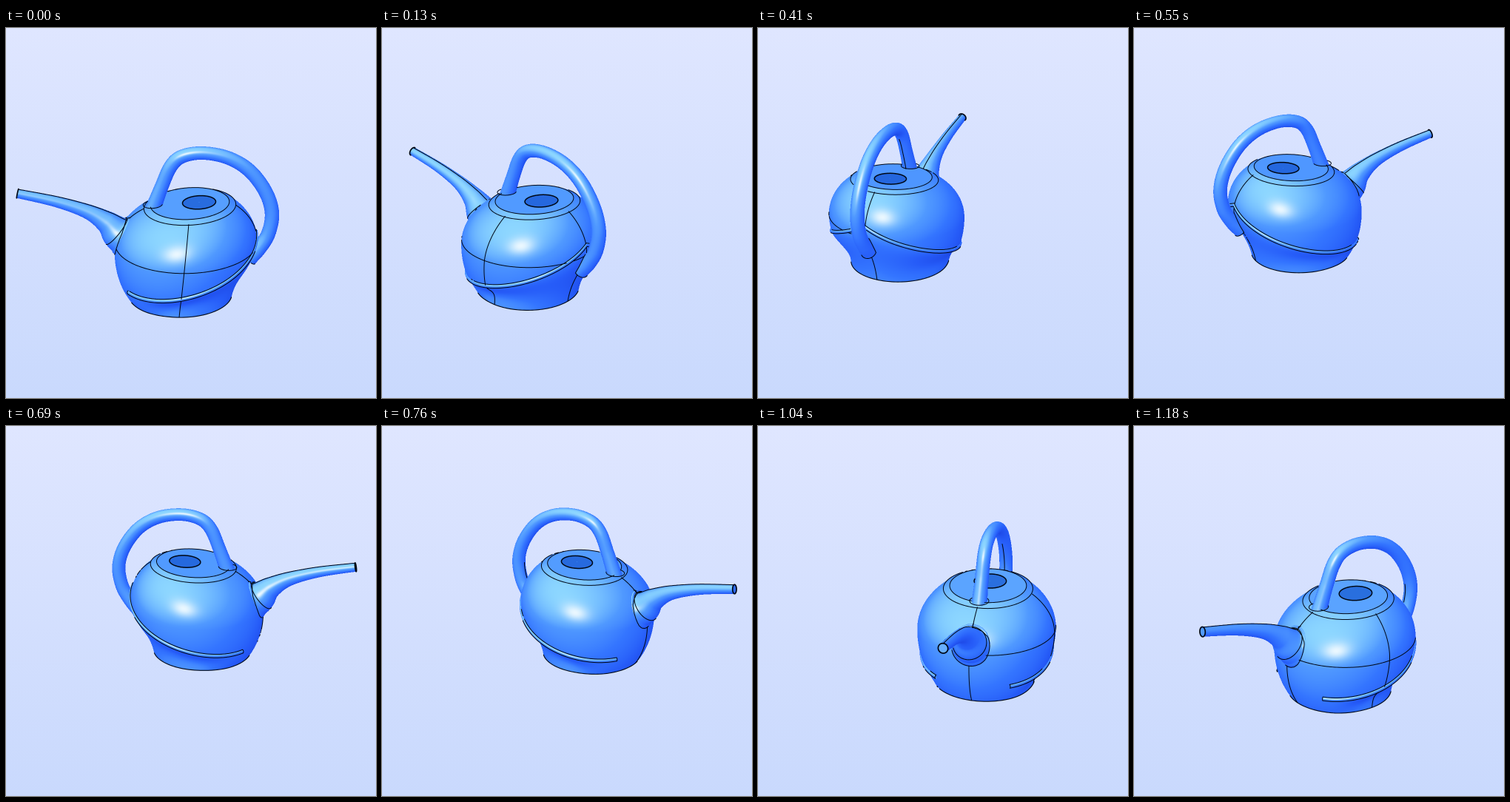
Recreate the animation shown at these times as an HTML page with a canvas. Size 500 by 500 pixels, loop 1.25 s.

```html
<!DOCTYPE html>
<html lang="en">
<head>
<meta charset="utf-8">
<title>Turning watering can</title>
<style>
html, body { margin: 0; height: 100%; overflow: hidden; background: #d4dffe; }
canvas { display: block; width: 100vw; height: 100vh; }
</style>
</head>
<body>
<canvas id="stage" width="500" height="500"></canvas>
<script>
const SIZE = 500, S = 2, W = SIZE * S;
const LOOP = 1250, FRAMES = 18, TURN = 2 * Math.PI / 19;
const { PI, sin, cos, abs, min, max, hypot, exp, sqrt, floor, ceil } = Math;
const rad = d => d * PI / 180;
const mix = (a, b, t) => a + (b - a) * t;
const smooth = (a, b, x) => {
  const t = min(1, max(0, (x - a) / (b - a)));
  return t * t * (3 - 2 * t);
};

// ---- camera ----
const TILT = rad(24.2), CE = cos(TILT), SE = sin(TILT), DIST = 1800;
const AXIS_X = 245.5, AXIS_Y = 247.6, ORBIT = 66;
let ca = 1, sa = 0, ox = 0, oz = 0;

function aim(angle) {
  ca = cos(angle);
  sa = sin(angle);
  ox = ORBIT * cos(angle - rad(83.5));
  oz = ORBIT * sin(angle - rad(83.5));
}
// model axes: u toward the spout, y up, w to the side
function viewDir([u, y, w]) {
  const x = u * ca + w * sa, z = u * sa - w * ca;
  return [x, y * CE - z * SE, z * CE + y * SE];
}
function project(p) {
  const [vx, vy, vz] = viewDir(p);
  const x = vx + ox, y = vy - oz * SE, d = vz + oz * CE;
  const k = DIST / (DIST - d);
  return [S * (AXIS_X + k * x), S * (AXIS_Y - k * y), d];
}

// ---- shapes ----
const LOW = -90, HIGH = 37, TALL = HIGH - LOW;
const level = y => (y - LOW) / TALL;
const fromBack = a => PI - Math.acos(max(-1, min(1, cos(a))));
const ridgeY = a => -64 * sin(0.62 * fromBack(a));

function bodyRadius(a, y) {
  const h = (y + 18) / (y > -18 ? 70 : 110);
  const full = 93 * sqrt(max(0, 1 - h * h));
  const t = ridgeY(a) - y;
  if (t <= 0) return full;
  const b = fromBack(a);
  const inset = (1 - smooth(rad(95), rad(138), b)) * (full - min(full, 68));
  const len = 15 + 45 * ((1 + cos(b)) / 2) ** 5;
  return full - inset * (1 - exp(-((t / len) ** 2)));
}
function body(a, s, out = 0, up = 0) {
  const y = LOW + s * TALL, r = bodyRadius(a, y) + out;
  return [-12 * s + r * cos(a), y + up - 3.3 * s * s * cos(a), r * sin(a)];
}
function insideBody([u, y, w]) {
  if (y > HIGH) return false;
  const c = u + 12 * level(y);
  return hypot(c, w) < bodyRadius(Math.atan2(w, c), y);
}
function ridge(a, t) {
  return body(a, level(ridgeY(a)), 0.2 + 2 * cos(t), 2.6 * sin(t));
}
const lidY = u => 41 - 0.055 * (u + 12);
function lidRing(a, r, u0, lift = 0) {
  const u = u0 + r * cos(a);
  return [u, lidY(u) + lift, r * sin(a)];
}
function bevel(a, t) {
  const r = mix(59.5, 51, t), u = -12 + r * cos(a);
  return [u, lidY(u) - 4 * (1 - t), r * sin(a)];
}

// each knot: u, y, radius
const SPOUT = [[60, -14, 33], [76, -5, 27], [84, 0, 22], [97, 13, 15],
  [121, 27.5, 9.8], [161, 41, 7.3], [211, 52, 6]];
const HANDLE = [[35, 33, 11], [33, 40, 10], [24, 64.7, 9], [12.5, 92, 9],
  [-2.3, 106, 8.8], [-28.8, 110.8, 8.5], [-61, 104.5, 8.7], [-88.5, 87, 9],
  [-109.5, 58, 9.2], [-118.5, 28, 9.3], [-114.5, -1.2, 9.4],
  [-103, -22, 10], [-90, -37, 11]];

function along(knots, t) {
  const n = knots.length - 1;
  t = min(n, max(0, t));
  const i = min(n - 1, floor(t)), f = t - i;
  const at = j => knots[min(n, max(0, j))];
  const [a, b, c, d] = [at(i - 1), at(i), at(i + 1), at(i + 2)];
  return b.map((v, j) => v + f / 2 * (c[j] - a[j] +
    f * (2 * a[j] - 5 * v + 4 * c[j] - d[j] + f * (3 * (v - c[j]) + d[j] - a[j]))));
}
function tube(knots, t, a, grow = 1) {
  const [u, y, r] = along(knots, t);
  const p = along(knots, t - 0.02), q = along(knots, t + 0.02);
  const du = q[0] - p[0], dy = q[1] - p[1], len = hypot(du, dy);
  const k = r * grow * cos(a) / len;
  return [u - dy * k, y + du * k, r * grow * sin(a)];
}
const spout = (t, a) => tube(SPOUT, t, a);
const handle = (t, a) => tube(HANDLE, t, a);

// ---- rasteriser ----
const buf = document.createElement("canvas");
buf.width = buf.height = W;
const pen = buf.getContext("2d");
const img = pen.createImageData(W, W);
const depth = new Float32Array(W * W);

const RAMP = [[0, 30, 74, 232], [0.3, 38, 92, 248], [0.58, 52, 117, 255],
  [0.81, 80, 153, 255], [1, 140, 214, 255]];
const unit = v => {
  const l = hypot(...v) || 1;
  return v.map(c => c / l);
};
const LIGHT = unit([-0.28, 0.42, 0.86]), SHINE = unit([-0.15, 0.1, 0.98]);
const dot = (a, x, y, z) => a[0] * x + a[1] * y + a[2] * z;

function paint(at, x, y, z, tone) {
  const l = (z < 0 ? -1 : 1) / (hypot(x, y, z) || 1);
  x *= l; y *= l; z *= l;
  const t = min(1, max(0, (dot(LIGHT, x, y, z) + 0.45) / 1.45));
  let i = 1;
  while (i < RAMP.length - 1 && RAMP[i][0] < t) i++;
  const a = RAMP[i - 1], b = RAMP[i], f = (t - a[0]) / (b[0] - a[0]);
  const g = tone < 1 ? 0 : 0.95 * max(0, dot(SHINE, x, y, z)) ** 65;
  const px = img.data;
  px[at] = mix(mix(a[1], b[1], f) * tone * tone, 240, g);
  px[at + 1] = mix(mix(a[2], b[2], f) * tone, 250, g);
  px[at + 2] = mix(mix(a[3], b[3], f) * (0.6 + 0.4 * tone), 255, g);
  px[at + 3] = 255;
}
function triangle(a, b, c, tone) {
  const area = (b[0] - a[0]) * (c[1] - a[1]) - (b[1] - a[1]) * (c[0] - a[0]);
  if (abs(area) < 1e-6) return;
  const x0 = max(0, ceil(min(a[0], b[0], c[0]) - 0.5));
  const x1 = min(W - 1, floor(max(a[0], b[0], c[0]) - 0.5));
  const y0 = max(0, ceil(min(a[1], b[1], c[1]) - 0.5));
  const y1 = min(W - 1, floor(max(a[1], b[1], c[1]) - 0.5));
  for (let y = y0; y <= y1; y++) {
    for (let x = x0; x <= x1; x++) {
      const px = x + 0.5, py = y + 0.5;
      const p = ((b[0] - px) * (c[1] - py) - (b[1] - py) * (c[0] - px)) / area;
      const q = ((c[0] - px) * (a[1] - py) - (c[1] - py) * (a[0] - px)) / area;
      const r = 1 - p - q;
      if (p < -1e-6 || q < -1e-6 || r < -1e-6) continue;
      const d = p * a[2] + q * b[2] + r * c[2], at = y * W + x;
      if (d <= depth[at]) continue;
      depth[at] = d;
      paint(at * 4, p * a[3] + q * b[3] + r * c[3], p * a[4] + q * b[4] + r * c[4],
        p * a[5] + q * b[5] + r * c[5], tone);
    }
  }
}
function normal(f, s, t) {
  const e = 0.004;
  const p = f(s + e, t), q = f(s - e, t), g = f(s, t + e), h = f(s, t - e);
  const [a, b, c] = p.map((v, i) => v - q[i]);
  const [d, k, m] = g.map((v, i) => v - h[i]);
  return unit([b * m - c * k, c * d - a * m, a * k - b * d]);
}
function surface(f, [s0, s1, ns], [t0, t1, nt], tone = 1) {
  let last = null;
  for (let i = 0; i <= ns; i++) {
    const row = [];
    for (let j = 0; j <= nt; j++) {
      const s = mix(s0, s1, i / ns), t = mix(t0, t1, j / nt);
      row.push([...project(f(s, t)), ...viewDir(normal(f, s, t))]);
    }
    if (last) {
      for (let j = 0; j < nt; j++) {
        triangle(last[j], row[j], row[j + 1], tone);
        triangle(last[j], row[j + 1], last[j + 1], tone);
      }
    }
    last = row;
  }
}

// ---- feature lines ----
function visible([x, y, d]) {
  const i = floor(x), j = floor(y);
  return i >= 0 && j >= 0 && i < W && j < W && d + 2.2 > depth[j * W + i];
}
function line(f, from, to, { steps = 160, width = 1, show = null } = {}) {
  pen.lineWidth = width * S;
  pen.beginPath();
  let on = false;
  for (let i = 0; i <= steps; i++) {
    const t = mix(from, to, i / steps), at = f(t), p = at && project(at);
    const seen = p && visible(p) && (!show || show(t));
    if (seen) on ? pen.lineTo(p[0], p[1]) : pen.moveTo(p[0], p[1]);
    on = seen;
  }
  pen.stroke();
}
// where a tube leaves the body, walking from t0 by step
function seam(knots, a, t0, step) {
  for (let t = t0, i = 0; i < 80; i++, t += step) {
    const p = tube(knots, t, a);
    if (!insideBody(p)) return p;
  }
  return null;
}

function renderFrame(n) {
  aim(rad(181.5) + n * TURN);
  img.data.fill(0);
  depth.fill(-1e9);

  const full = [0, 2 * PI, 96], round = [0, 2 * PI, 22];
  const tip = SPOUT.length - 1, end = HANDLE.length - 1;
  const ends = [rad(36), rad(324)];
  surface(body, full, [0, 1, 44]);
  surface(bevel, full, [0, 1, 2]);
  surface((a, r) => lidRing(a, r, -12), full, [0.5, 51, 6]);
  surface((a, r) => lidRing(a, r, -24, 0.6), full, [0.5, 21.5, 4], 0.68);
  surface(ridge, [...ends, 110], [0, 2 * PI, 8]);
  surface(spout, [0, tip, 54], round);
  surface((g, a) => tube(SPOUT, tip, a, g), [0.03, 1, 2], round);
  surface(handle, [0, end, 84], round);

  pen.putImageData(img, 0, 0);
  pen.strokeStyle = "#000814";
  pen.lineJoin = pen.lineCap = "round";
  const ring = (f, opt) => line(f, 0, 2 * PI, opt);

  ring(a => body(a, 0), { width: 1.1 });
  ring(a => bevel(a, 0));
  ring(a => bevel(a, 1));
  ring(a => lidRing(a, 21.5, -24, 0.6), { width: 1.5 });
  ring(a => lidRing(a, 12.5, 36, 0.3));
  for (const a of [0, PI / 2, PI]) line(s => body(a, s), 0, 1);
  line(a => body(a, level(-14)), 0, PI);
  for (const t of [-0.9, PI / 2]) line(a => ridge(a, t), ...ends);
  for (const a of ends) line(t => ridge(a, t), -0.9, PI / 2, { steps: 10 });

  ring(a => seam(SPOUT, a, 0, 0.03), { steps: 60 });
  ring(a => spout(2, a), { steps: 60 });
  ring(a => spout(tip, a), { steps: 40, width: 1.7 });
  line(t => spout(t, 0), 1, tip);
  ring(a => seam(HANDLE, a, end, -0.03), { steps: 40 });
  // the inner seam only shows where the handle is seen along its plane
  const facing = t => abs(viewDir(normal(handle, t, 0))[2]) > 0.45;
  line(t => handle(t, 0), 1, end - 1, { show: facing });
}

// ---- playback ----
const stage = document.getElementById("stage").getContext("2d");
const sky = stage.createLinearGradient(0, 0, 0, SIZE);
sky.addColorStop(0, "#dfe6ff");
sky.addColorStop(1, "#c9d9fd");
const cache = [];

function frame(n) {
  if (!cache[n]) {
    renderFrame(n);
    const c = document.createElement("canvas");
    c.width = c.height = SIZE;
    const g = c.getContext("2d");
    g.imageSmoothingQuality = "high";
    g.drawImage(buf, 0, 0, SIZE, SIZE);
    cache[n] = c;
  }
  return cache[n];
}
for (let n = 0; n < FRAMES; n++) frame(n);

let shown = -1;
const start = performance.now();
function tick(now) {
  const t = max(0, now - start) % LOOP;
  const n = min(FRAMES - 1, floor((t + 9) * FRAMES / LOOP));
  if (n !== shown) {
    stage.fillStyle = sky;
    stage.fillRect(0, 0, SIZE, SIZE);
    stage.drawImage(frame(n), 0, 0);
    shown = n;
  }
  requestAnimationFrame(tick);
}
tick(start);
</script>
</body>
</html>
```
